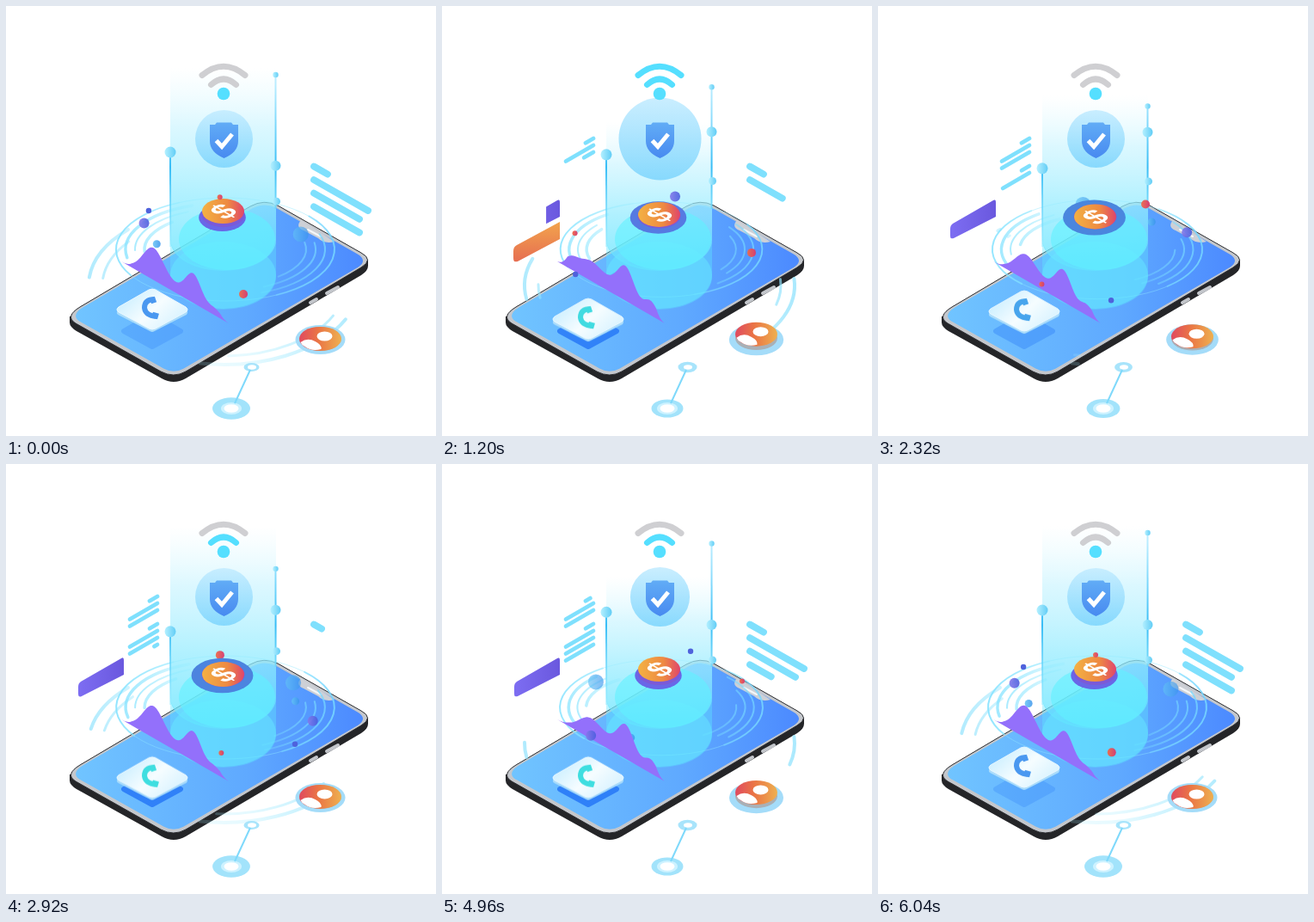
These frames come from a looping animation (500x500 px, 6080 ms). An HTML page:

```html
<!DOCTYPE html>
<html lang="en">
<head>
<meta charset="utf-8">
<title>Secure phone</title>
<style>
html, body { margin: 0; width: 100%; height: 100%; overflow: hidden; background: #fff; }
svg { display: block; width: 100vw; height: 100vh; }
.line { fill: none; stroke: #7fe0fd; stroke-linecap: round; }
.wifi { fill: none; stroke: #cfcfd2; stroke-width: 7; stroke-linecap: round; animation: 2026.67ms step-end infinite; }
.inner { animation-name: inner; }
.outer { animation-name: outer; }
@keyframes inner { 0% { stroke: #cfcfd2 } 24% { stroke: #55dfff } 96% { stroke: #cfcfd2 } }
@keyframes outer { 0% { stroke: #cfcfd2 } 51% { stroke: #55dfff } 96% { stroke: #cfcfd2 } }

#halo { animation: halo 3040ms ease-in-out infinite; }
@keyframes halo { 0%, 70%, 100% { r: 33.5px } 33% { r: 49px } }

#tile, #tileShade, .call { animation: 1013.33ms ease-in-out infinite alternate; }
.call { fill: none; animation-name: call; }
#tile { animation-name: press; }
#tileShade { animation-name: shade; }
@keyframes call { from { stroke: #4a98f0 } to { stroke: #3fe0e0 } }
@keyframes press { to { transform: translateY(12px) } }
@keyframes shade { from { opacity: .28 } to { opacity: 1 } }

.bar { animation: 3040ms linear infinite; }
#low { animation-name: low; }
#high { animation-name: high; }
@keyframes low {
  0%, 10% { clip-path: inset(0 0 0 100%) }
  26%, 57.5% { clip-path: inset(0) }
  62%, 100% { clip-path: inset(0 100% 0 0) }
}
@keyframes high {
  0%, 35% { clip-path: inset(0 0 0 100%) }
  50%, 96.4% { clip-path: inset(0) }
  98%, 100% { clip-path: inset(0 100% 0 0) }
}
</style>
</head>
<body>
<svg viewBox="0 0 500 500">
  <defs>
    <linearGradient id="screen"><stop stop-color="#70c4ff"/><stop offset=".6" stop-color="#5fa9ff"/><stop offset="1" stop-color="#4c8aff"/></linearGradient>
    <linearGradient id="beamFill" gradientUnits="userSpaceOnUse" x1="0" y1="72" x2="0" y2="300">
      <stop stop-color="#d8f8ff" stop-opacity="0"/><stop offset=".3" stop-color="#c4f3ff" stop-opacity=".6"/>
      <stop offset=".65" stop-color="#96ecff" stop-opacity=".75"/><stop offset="1" stop-color="#62e4ff" stop-opacity=".75"/>
    </linearGradient>
    <linearGradient id="edge" gradientUnits="userSpaceOnUse" x1="0" y1="90" x2="0" y2="285">
      <stop stop-color="#6fd8ff" stop-opacity=".45"/><stop offset=".5" stop-color="#38bdf6"/><stop offset="1" stop-color="#8eeaff" stop-opacity=".4"/>
    </linearGradient>
    <linearGradient id="coinFill"><stop stop-color="#f3b143"/><stop offset=".6" stop-color="#ee8a42"/><stop offset="1" stop-color="#e0456b"/></linearGradient>
    <linearGradient id="userFill"><stop stop-color="#e04a60"/><stop offset=".45" stop-color="#ea7545"/><stop offset="1" stop-color="#eeb050"/></linearGradient>
    <linearGradient id="haloFill" x2="0" y2="1"><stop stop-color="#c4ecff"/><stop offset="1" stop-color="#7fd6fd"/></linearGradient>
    <linearGradient id="shieldFill" x2="0" y2="1"><stop stop-color="#61acf6"/><stop offset="1" stop-color="#488af0"/></linearGradient>
    <linearGradient id="tileFill" x2="1" y2=".6"><stop stop-color="#bdeaff"/><stop offset=".6" stop-color="#f6fdff"/><stop offset="1" stop-color="#d9f3ff"/></linearGradient>
    <linearGradient id="lowFill" x2="0" y2="1"><stop stop-color="#f2a44c"/><stop offset="1" stop-color="#e66e52"/></linearGradient>
    <linearGradient id="highFill"><stop stop-color="#7d6df2"/><stop offset="1" stop-color="#6a58de"/></linearGradient>
    <linearGradient id="ringFill" gradientUnits="userSpaceOnUse" x1="128" x2="382" y1="0" y2="0">
      <stop stop-color="#86e2ff"/><stop offset=".38" stop-color="#7fe6ff" stop-opacity=".15"/>
      <stop offset=".62" stop-color="#7fe6ff" stop-opacity=".15"/><stop offset="1" stop-color="#74d4ff"/>
    </linearGradient>
    <linearGradient id="orbitFill" gradientUnits="userSpaceOnUse" x1="96" x2="410" y1="0" y2="0">
      <stop stop-color="#8fe2fd" stop-opacity=".7"/><stop offset=".35" stop-color="#a5ecff" stop-opacity=".15"/>
      <stop offset=".6" stop-color="#a5ecff" stop-opacity=".3"/><stop offset="1" stop-color="#8fe2fd" stop-opacity=".75"/>
    </linearGradient>
    <linearGradient id="bead"><stop stop-color="#b4f0ff"/><stop offset="1" stop-color="#62cdf6"/></linearGradient>
    <linearGradient id="purpleBall"><stop stop-color="#8478ea"/><stop offset="1" stop-color="#4a5ede"/></linearGradient>
    <linearGradient id="redBall"><stop stop-color="#ef6a48"/><stop offset="1" stop-color="#d8386e"/></linearGradient>
    <linearGradient id="blueBall"><stop stop-color="#63c2f5"/><stop offset="1" stop-color="#3a94ec"/></linearGradient>
  </defs>

  <!-- phone -->
  <path fill="#242528" d="M74 361V368Q74 373 82 378L181 433Q195 441 209 433L413 313Q421 308 421 302V295Z"/>
  <path fill="#c4c7cc" stroke="#2b2c30" d="M86 350L284 233Q300 224 316 232L413 287Q428 295 413 304L209 425Q195 433 180 425L81 369Q68 361 86 350Z"/>
  <path fill="url(#screen)" stroke="url(#screen)" stroke-width="1.500" d="M90 351L287 236Q300 229 313 235L408 289Q420 296 409 303L206 421Q195 427 184 421L86 366Q76 360 90 351Z"/>
  <path fill="#cdd0d6" d="M343 249Q336 257 346 261L363 270Q370 277 382 274Z"/>
  <path stroke="#f4f6f8" stroke-width="2" stroke-linecap="round" d="M351 260L366 268"/>
  <path stroke="#c3c6cb" stroke-width="4" stroke-linecap="round" d="M354 345L361 341M373 334L386 327"/>

  <g id="orbits"></g>
  <g id="rings"></g>

  <!-- light column -->
  <path fill="#5ee4ff" opacity=".4" d="M191 270V315A61.5 38 0 0 0 314 315V270A61.5 36 0 0 1 191 270Z"/>
  <ellipse cx="252.500" cy="313" rx="61.500" ry="39" fill="#66ecff" opacity=".45"/>
  <path id="beam" fill="url(#beamFill)"/>
  <ellipse cx="257" cy="271" rx="56" ry="36" fill="#62f2ff" opacity=".6"/>
  <path id="leftEdge" stroke="url(#edge)" stroke-width="2"/>
  <path id="rightEdge" stroke="url(#edge)" stroke-width="2"/>
  <g id="beads" fill="url(#bead)"></g>

  <!-- shield -->
  <circle id="halo" cx="253.500" cy="154.500" r="33.500" fill="url(#haloFill)" opacity=".9"/>
  <path fill="url(#shieldFill)" d="M245 135.500H262L264 138H270V157Q270 170 253.500 177Q237 170 237 157V138H243Z"/>
  <path fill="none" stroke="#fff" stroke-width="5" d="M244.500 156.500L251 163.500L263 149"/>

  <!-- signal -->
  <path class="wifi outer" d="M228 80.500Q253 60 278 80.500"/>
  <path class="wifi inner" d="M238.500 91.500Q253 78.500 267.500 91.500"/>
  <circle cx="253" cy="102" r="7.300" fill="#55dfff"/>

  <!-- call tile -->
  <path id="tileShade" fill="#2f80f8" stroke="#2f80f8" stroke-width="6" stroke-linejoin="round" d="M137 378L170 359L203 378L170 396Z"/>
  <g id="tile">
    <path fill="#a9dcfb" stroke="#a9dcfb" stroke-width="8" stroke-linejoin="round" d="M133 356L170 336L207 356L170 375Z"/>
    <path fill="url(#tileFill)" stroke="#eaf8ff" d="M131 350L166 330Q170 328 174 330L209 350Q213 353 209 356L174 375Q170 377 166 375L131 356Q127 353 131 350Z"/>
    <path class="call" stroke-width="6" d="M173 341Q161 341 161 351Q162 360 175 361"/>
    <path class="call" stroke-width="7" d="M168 343L174 341M170 359L177 361"/>
  </g>

  <!-- bars -->
  <path id="low" class="bar" fill="url(#lowFill)" d="M87 278L137 251V271L88 297Q83 299 83 293V285Q83 280 87 278Z"/>
  <path id="high" class="bar" fill="url(#highFill)" d="M87 253L134 226Q137 224 137 228V245L88 270Q84 272 84 267V259Q84 255 87 253Z"/>

  <g id="lines"></g>
  <g id="underBalls"></g>
  <path id="wave" fill="#9370fb"/>

  <!-- coin -->
  <ellipse id="plate" cx="251.500" cy="246"/>
  <g id="coin">
    <ellipse id="coinRim" rx="25" ry="14.500" fill="#7b5ad8"/>
    <ellipse rx="24.500" ry="14.500" fill="url(#coinFill)"/>
    <text transform="matrix(.8 -.46 .8 .46 0 0)" y="13" text-anchor="middle" font-family="'Liberation Sans', Arial, sans-serif" font-weight="700" font-size="37" fill="#fff">$</text>
  </g>

  <!-- user badge -->
  <ellipse id="badge" cx="365.500" cy="388" fill="#a4dcf9"/>
  <g id="user">
    <ellipse id="rim" rx="24.500" ry="14" fill="#a9b0b6"/>
    <ellipse rx="24.500" ry="14" fill="url(#userFill)"/>
    <ellipse cx="5" cy="-3" rx="9" ry="5.500" fill="#fff"/>
    <path fill="#fff" d="M-23 4Q-15 -2 -6 3Q2 7 1 12Q-10 15 -18 9Q-22 7 -23 4Z"/>
  </g>

  <!-- nodes -->
  <ellipse id="node" cx="262" cy="468" fill="#a2e3fb"/>
  <ellipse cx="262" cy="468" rx="12" ry="7" fill="#cdf2ff"/>
  <ellipse cx="262" cy="468" rx="8.500" ry="4.800" fill="#fff"/>
  <ellipse id="pin" cx="285.500" cy="420" fill="#a8e4fb"/>
  <ellipse cx="286" cy="420" rx="5" ry="2.800" fill="#fff"/>
  <path stroke="#7fd9fb" stroke-width="2" d="M284 423L266 462"/>

  <g id="balls"></g>
</svg>
<script>
const LOOP = 6080, HALF = LOOP / 2, TAU = 2 * Math.PI;
const $ = id => document.getElementById(id);
const set = (el, attrs) => { for (const k in attrs) el.setAttribute(k, attrs[k]); };
const add = (parent, tag, attrs) => {
  const el = document.createElementNS('http://www.w3.org/2000/svg', tag);
  set(el, attrs);
  return $(parent).appendChild(el);
};
const clamp = v => Math.min(1, Math.max(0, v));
const ramp = (t, start, length) => clamp((t - start) / length);
const mix = (a, b, p) => a + (b - a) * p;
const rad = deg => deg * TAU / 360;
// 0 at the ends of a period, 1 in its middle
const swell = (t, period) => (1 - Math.cos(TAU * t / period)) / 2;

function arc(cx, cy, rx, ry, from, to) {
  const at = a => `${cx + rx * Math.cos(rad(a))} ${cy + ry * Math.sin(rad(a))}`;
  return `M${at(from)}A${rx} ${ry} 0 0 1 ${at(to)}`;
}

function drawLine(el, x1, x2, yAt) {
  set(el, { x1, x2, y1: yAt(x1), y2: yAt(x2), opacity: x2 - x1 > .1 ? 1 : 0 });
}

const leftRows = Array.from({ length: 7 }, () => add('lines', 'line', { class: 'line', 'stroke-width': 4.7 }));
const rightRows = [374, 421, 411, 411].map(end =>
  ({ end, el: add('lines', 'line', { class: 'line', 'stroke-width': 7.8 }) }));

function drawRows(t) {
  leftRows.forEach((el, i) => {
    const length = i === 0 || i === 3 ? 9 : 32, y = 154 + 8 * i + (i > 2 ? 8 : 0);
    const grown = ramp(t, 180 + 450 * i, length * 11), gone = ramp(t, 4880 + 150 * i, 200);
    drawLine(el, 176 - length * grown, 176 - length * gone, x => y + (176 - x) * .58);
  });
  rightRows.forEach(({ end, el }, i) => {
    const shown = 1 - ramp(t, 1450 - 470 * i, 550) + ramp(t, 2580 + 700 * i, 600);
    drawLine(el, 358, mix(358, end, shown), x => 186.5 + 15.6 * i + (x - 358) * .57);
  });
}

// wide orbits: a streak on each side, its head runs ahead and its tail catches up
const orbits = [0, 1].flatMap(inner => [[100, -5], [225, 170]].map(([from, to]) => ({
  inner, from, to,
  el: add('orbits', 'path', { fill: 'none', stroke: 'url(#orbitFill)', 'stroke-linecap': 'round', 'stroke-width': 4 - inner })
})));

function drawOrbits(p) {
  const s = (p + HALF - 2300) % HALF;
  const head = 1 - (1 - ramp(s, 0, 1600)) ** 2;
  for (const { inner, from, to, el } of orbits) {
    const tail = ramp(s, 740 - 300 * inner, 2300 - 500 * inner) ** 1.2;
    const a = mix(from, to, head), b = mix(from, to, tail);
    set(el, { d: b - a > .5 ? arc(253, 325, 157 - 16 * inner, 92 - 10 * inner, a, b) : '' });
  }
}

const oval = add('rings', 'ellipse', { cx: 255, cy: 283, fill: 'none', stroke: '#8ee6ff', opacity: .45 });
const rings = [0, 1, 2, 3].flatMap(i => [0, 1].map(side => ({
  i, side,
  el: add('rings', 'path', {
    fill: 'none', stroke: 'url(#ringFill)', 'stroke-linecap': 'round', opacity: .85,
    'stroke-width': side ? 2 : 2 + i % 2 * 1.5
  })
})));

function drawRings(p) {
  const size = 1 - .085 * swell(p, HALF);
  set(oval, { rx: 127 * size, ry: 60 * size });
  for (const { i, side, el } of rings) {
    const turn = 14 * Math.sin(TAU * p / HALF + i);
    const [a, b] = side ? [-40 + 9 * i, 62 - 5 * i] : [150 + 8 * i, 245 - 6 * i];
    set(el, { d: arc(255, 283, (127 - 11 * i) * size, (60 - 6 * i) * size, a + turn, b + turn) });
  }
}

// bumps of changing height on a slanted base
function drawWave(p) {
  const q = swell(p, HALF), early = Math.max(0, Math.sin(TAU * p / HALF));
  const hill = (x, mid, width, height) => height * Math.exp(-(((x - mid) / width) ** 2) / 2);
  let d = 'M134 297';
  for (let x = 134; x <= 259; x++) {
    const h = hill(x, 171, 12, mix(33, 13, q)) + hill(x, mix(218, 213, q), 9, 28)
      + hill(x, 200, 26, mix(8, 15, q)) + hill(x, 243, 7, mix(6, 14, q)) + hill(x, 150, 8, 17 * early);
    const taper = clamp((x - 134) / 12) * clamp((259 - x) / 10);
    d += `L${x} ${297 + (x - 134) * .576 - h * taper}`;
  }
  set($('wave'), { d: d + 'Z' });
}

// layer, size, paint, start angle, turns per loop, orbit scale, opacity
const balls = [
  ['underBalls', 9, 'url(#blueBall)', -16, 2, .86, .65],
  ['underBalls', 4.5, 'url(#blueBall)', 183, 1, .77, .85],
  ['underBalls', 5, 'url(#redBall)', 79, -1, 1, .95],
  ['balls', 6, 'url(#purpleBall)', 207, 1, 1.02, .9],
  ['balls', 3, 'url(#redBall)', -94, -1, 1, .95],
  ['balls', 3.2, '#4f62dc', -140, -1, 1.12, 1]
].map(([layer, r, fill, start, turns, scale, opacity]) =>
  ({ start, turns, scale, el: add(layer, 'circle', { r, fill, opacity }) }));

function drawBalls(t) {
  for (const { start, turns, scale, el } of balls) {
    const a = rad(start + 360 * turns * t / LOOP);
    set(el, { cx: 256 + 105 * scale * Math.cos(a), cy: 279 + 57 * scale * Math.sin(a) });
  }
}

const [leftBead, topBead, midBead, endBead] = [[191, 6.5], [313.5, 3.2], [313.5, 6], [314.5, 4.5]]
  .map(([cx, r]) => add('beads', 'circle', { cx, r }));

function drawBeam(t, p) {
  const top = 72 + 70 * swell(p, HALF);
  set($('beam'), { d: `M191 ${top}V272A61.5 36 0 0 0 314 272V${top}Z` });
  set($('beamFill'), { y1: top });
  const slow = swell(t, LOOP), dip = swell(3900 * ramp(t, -200, 3900), 3900);
  const left = 170 + 25 * slow ** 2, right = 80 + 42 * slow;
  set(leftBead, { cy: left });
  set(topBead, { cy: right });
  set(midBead, { cy: 187 - 50 * dip });
  set(endBead, { cy: 228 - 30 * dip });
  set($('leftEdge'), { d: `M191 ${left}L191.1 280` });
  set($('rightEdge'), { d: `M313.5 ${right}L313.6 236` });
}

function drawIcons(t, p) {
  const lift = Math.cos(TAU * (t - 5500) / LOOP), low = (1 - lift) / 2;
  set($('coin'), { transform: `translate(252.5 ${241.5 - 3.5 * lift})` });
  set($('coinRim'), { cy: 2.2 + 2.2 * lift });
  set($('plate'), {
    rx: 31.5 - 5 * lift, ry: 18 - 2.5 * lift,
    fill: `rgb(${mix(108, 74, low)},${mix(100, 134, low)},${mix(232, 222, low)})`
  });
  const up = swell(p, HALF), shrink = Math.min(1, 1.6 * up);
  set($('user'), { transform: `translate(365.5 ${387 - 6 * up})` });
  set($('rim'), { cy: 5 * up });
  set($('badge'), { rx: 29 + 3 * up, ry: 17 + 1.5 * up });
  set($('node'), { rx: 22 - 3.5 * shrink, ry: 12.7 - 2.2 * shrink });
  set($('pin'), { rx: 9 + 2 * shrink, ry: 5 + 1.2 * shrink });
}

let begin;
function frame(now) {
  begin ??= now;
  const t = (now - begin) % LOOP, p = t % HALF;
  drawBeam(t, p);
  drawOrbits(p);
  drawRings(p);
  drawWave(p);
  drawRows(t);
  drawBalls(t);
  drawIcons(t, p);
  requestAnimationFrame(frame);
}
requestAnimationFrame(frame);
</script>
</body>
</html>
```
